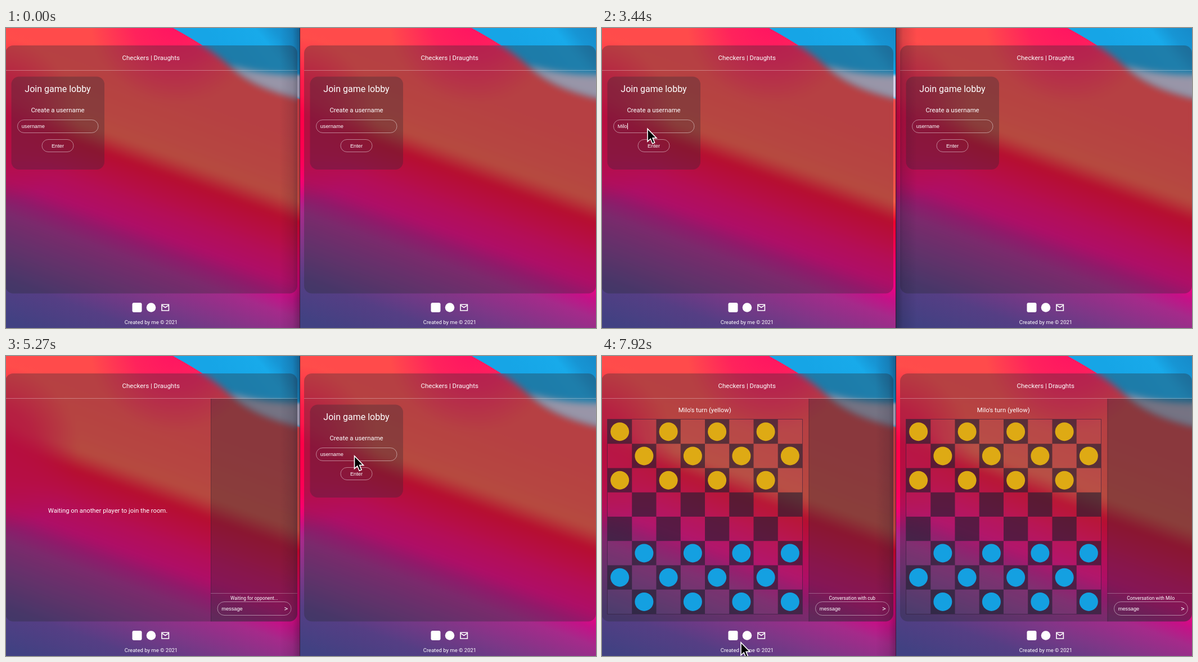
Recreate the animation shown at these times as an HTML page with a canvas. Size 1049 by 534 pixels, loop 8 s.

```html
<!DOCTYPE html>
<html lang="en">
<head>
<meta charset="utf-8">
<title>Checkers | Draughts</title>
<style>
html, body { margin: 0; width: 100%; height: 100%; overflow: hidden; background: #403c78; }
canvas { display: block; }
</style>
</head>
<body>
<canvas id="stage" width="1049" height="534"></canvas>
<script>
const LOOP = 8000, H = 534, SHIFT = 531, PAD = 8;
const HOST = 'Milo', GUEST = 'cub';
const UI = 'Roboto, sans-serif', FIELD = '"Liberation Sans", Arial, sans-serif';
const SHADE = 'rgba(40,40,50,.31)', LINE = 'rgba(255,255,255,.45)';
const ctx = document.getElementById('stage').getContext('2d');

// drawing helpers, all in the coordinates of one window
function text(c, str, x, y, size, font = UI, align = 'center') {
  c.font = `${size}px ${font}`;
  c.textAlign = align;
  c.fillStyle = '#fff';
  c.fillText(str, x, y);
}

function box(c, x, y, w, h, r, fill, stroke) {
  c.beginPath();
  c.roundRect(x, y, w, h, r);
  if (fill) { c.fillStyle = fill; c.fill(); }
  if (stroke) { c.strokeStyle = stroke; c.lineWidth = 1; c.stroke(); }
}

function rect(c, x, y, w, h, fill) {
  c.fillStyle = fill;
  c.fillRect(x, y, w, h);
}

function disc(c, x, y, r, fill) {
  c.beginPath();
  c.arc(x, y, r, 0, 7);
  c.fillStyle = fill;
  c.fill();
}

function stops(gradient, list) {
  for (const [at, colour] of list) gradient.addColorStop(at, colour);
  return gradient;
}

function layer() {
  const c = document.createElement('canvas').getContext('2d');
  c.canvas.width = 532;
  c.canvas.height = H;
  c.translate(PAD, 0);
  return c;
}

function glow(c, x, y, r, rgb, alpha) {
  rect(c, -PAD, 0, 532, H, stops(c.createRadialGradient(x, y, 0, x, y, r), [
    [0, `rgba(${rgb},${alpha})`], [.5, `rgba(${rgb},${alpha * .7})`], [1, `rgba(${rgb},0)`]
  ]));
}

function wallpaper() {
  const c = layer();
  const bands = [
    [0, 255, 75, 75], [90, 255, 85, 72], [122, 255, 92, 70], [138, 255, 55, 58],
    [158, 255, 0, 45], [195, 255, 0, 75], [228, 252, 0, 105], [270, 243, 0, 130],
    [300, 195, 18, 135], [330, 165, 42, 138], [390, 125, 55, 135],
    [450, 85, 62, 132], [520, 65, 65, 130]
  ].map(([s, ...rgb]) => [s / 520, `rgb(${rgb})`]);
  rect(c, -PAD, 0, 532, H, stops(c.createLinearGradient(0, 0, -165.7, 460.3), bands));
  glow(c, -20, 165, 150, '255,0,75', .95);
  glow(c, 300, -15, 150, '255,15,100', .95);

  // blue wave with a pale lower rim
  const sky = stops(c.createLinearGradient(400, 60, 500, -20), [
    [0, '#16a5e6'], [.55, '#18aaea'], [.75, '#1795d4'], [1, '#178bca']
  ]);
  c.fillStyle = sky;
  c.fill(new Path2D('M297 0Q370 40 400 70Q440 108 531 128V0Z'));
  c.filter = 'blur(2px)';
  c.fillStyle = '#d2cde4';
  c.fill(new Path2D('M398 66Q450 84 535 84V128Q440 110 398 66Z'));
  return c.canvas;
}

function windowBase() {
  const c = layer(), wall = wallpaper();
  c.drawImage(wall, -PAD, 0);
  c.save();
  box(c, -1, 31, 519, 441.5, 14);
  c.clip();
  c.filter = 'blur(6px)';
  c.drawImage(wall, -PAD, 0);
  c.filter = 'none';
  rect(c, -1, 31, 519, 442, 'rgba(42,42,50,.34)');
  rect(c, -1, 75, 519, 1, 'rgba(255,255,255,.32)');
  c.restore();
  text(c, 'Checkers | Draughts', 257.7, 57, 11.5);
  text(c, 'Created by me © 2021', 258, 527, 9.5);
  box(c, 224.5, 489, 17, 17, 3, '#fff');
  disc(c, 258, 497.5, 8.3, '#fff');
  c.strokeStyle = '#fff';
  c.lineWidth = 1.6;
  c.stroke(new Path2D('M277 492.3H289.4V503H277ZM277 493.3L283.2 497.5L289.4 493.3'));
  return c.canvas;
}

function field(x, y, w, h, value, hint, caret) {
  box(ctx, x, y, w, h, h / 2, null, LINE);
  const base = y + h / 2 + 3.3;
  text(ctx, value || hint, x + 7.2, base, 9.25, FIELD, 'left');
  if (caret) rect(ctx, Math.round(x + 7.2 + (value ? ctx.measureText(value).width : 0)), base - 9, 1, 11, '#fff');
}

function lobby(value, caret) {
  box(ctx, 9.5, 86.5, 165.5, 165.5, 14, SHADE);
  text(ctx, 'Join game lobby', 92, 114, 16);
  text(ctx, 'Create a username', 92, 150, 11.35);
  field(20.5, 163.5, 143.5, 23, value, 'username', caret);
  box(ctx, 64, 198.5, 56, 22, 11, null, LINE);
  text(ctx, 'Enter', 92, 212.6, 9.25, FIELD);
}

function chat(x, label, caret) {
  ctx.save();
  box(ctx, -1, 31, 519, 441.5, 14);
  ctx.clip();
  rect(ctx, x, 76, 518 - x, 397, SHADE);
  rect(ctx, x, 76, 1, 397, 'rgba(30,20,40,.3)');
  rect(ctx, x, 422, 518 - x, 1, 'rgba(255,255,255,.28)');
  ctx.restore();
  text(ctx, label, x + 77.2, 433.7, 8.35);
  field(x + 12, 437.5, 131, 24, '', 'message', caret);
  text(ctx, '>', x + 134, 453.5, 13);
}

function game(partner, caret) {
  const left = 10, top = 113, cell = 43.25;
  text(ctx, `${HOST}'s turn (yellow)`, 182.7, 100, 11.35);
  for (let r = 0; r < 8; r++) for (let c = 0; c < 8; c++) {
    const x = left + c * cell, y = top + r * cell, dark = (r + c) % 2 === 0;
    rect(ctx, x, y, cell, cell, dark ? 'rgba(35,35,50,.62)' : 'rgba(255,255,255,.03)');
    if (dark && (r < 3 || r > 4)) {
      disc(ctx, x + cell / 2, y + cell / 2, 16.5, r < 3 ? '#deaa14' : '#14a0e1');
    }
  }
  box(ctx, left - .5, top - .5, 8 * cell + 1, 8 * cell + 1, 0, null, 'rgba(50,30,60,.6)');
  chat(367.5, `Conversation with ${partner}`, caret);
}

function waiting(caret) {
  text(ctx, 'Waiting on another player to join the room.', 181, 279, 11.3);
  chat(364, 'Waiting for opponent...', caret);
}

const within = (t, from, to) => t >= from && t < to;
const typed = (name, times, t) => name.slice(0, times.filter(k => t >= k).length);

function hostWindow(t) {
  if (t < 3740) {
    const caret = within(t, 1870, 2460) || t >= 2960;
    lobby(typed(HOST, [2960, 3050, 3240, 3440], t), caret);
  } else if (t < 7150) waiting(t < 4230);
  else game(GUEST, false);
}

function guestWindow(t) {
  if (t >= 7150) return game(HOST, t < 7640);
  // the first letter is typed, erased and typed again
  const value = within(t, 5570, 6070) ? GUEST[0] : typed(GUEST, [6360, 6560, 6660], t);
  lobby(value, within(t, 4780, 5270) || within(t, 5570, 7050));
}

// time, x, y
const path = [
  [1110, 591, 103], [1400, 145, 118], [1500, 145, 118], [1960, 81, 181],
  [2080, 81, 181], [2170, 81, 179.5], [4040, 81, 179.5], [4880, 617.5, 178],
  [4980, 619.5, 178], [7450, 619.5, 178], [7830, 129, 500], [7915, 247, 510]
];
const arrow = new Path2D('M0 0V22.5L5.2 17.8L8.8 26.3L12.6 24.6L9.1 16.4H16Z');

function cursor(t) {
  if (t < path[0][0]) return;
  const i = path.findIndex(p => p[0] > t);
  let [, x, y] = path.at(-1);
  if (i > 0) {
    const [t0, x0, y0] = path[i - 1], [t1, x1, y1] = path[i];
    const u = (t - t0) / (t1 - t0), e = u * u * (3 - 2 * u);
    x = x0 + (x1 - x0) * e;
    y = y0 + (y1 - y0) * e;
  }
  ctx.save();
  ctx.translate(x, y);
  ctx.fillStyle = '#000';
  ctx.fill(arrow);
  ctx.strokeStyle = '#fff';
  ctx.lineWidth = 1.6;
  ctx.stroke(arrow);
  ctx.restore();
}

const base = windowBase();

function pane(from, to, shift, content, t) {
  ctx.save();
  ctx.beginPath();
  ctx.rect(from, 0, to - from, H);
  ctx.clip();
  ctx.translate(shift, 0);
  ctx.drawImage(base, -PAD, 0);
  content(t);
  ctx.restore();
}

// the front window casts its shadow on the other one
function shadow(hostInFront) {
  const far = hostInFront ? 560 : 486, alpha = hostInFront ? .42 : .34;
  rect(ctx, Math.min(522, far), 0, Math.abs(far - 522), H, stops(ctx.createLinearGradient(522, 0, far, 0), [
    [0, `rgba(20,15,35,${alpha})`], [.35, `rgba(20,15,35,${alpha * .35})`], [1, 'rgba(20,15,35,0)']
  ]));
  rect(ctx, 522, 0, 1, H, 'rgba(40,20,45,.8)');
}

function draw(now) {
  const t = now % LOOP;
  pane(0, 523, 0, hostWindow, t);
  pane(523, 1049, SHIFT, guestWindow, t);
  shadow(within(t, 1870, 4780));
  cursor(t);
}

const start = performance.now();
function tick() {
  draw(performance.now() - start);
  requestAnimationFrame(tick);
}
tick();
</script>
</body>
</html>
```
